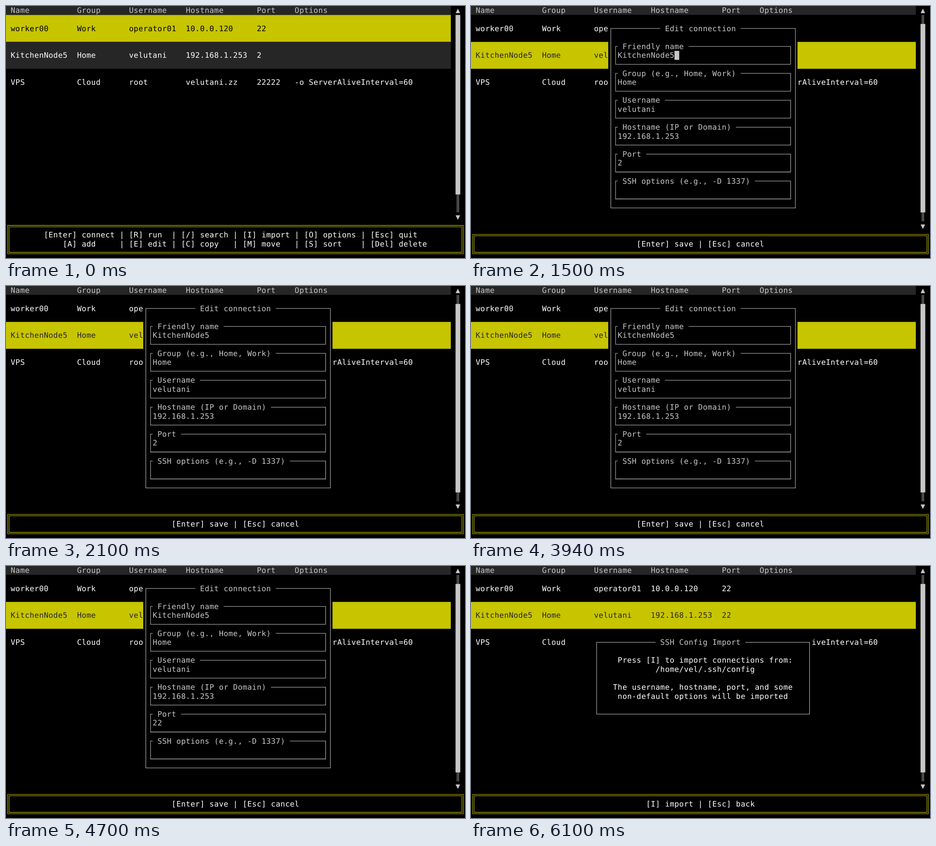
An HTML page for the animation above (8 s loop, 1000x550 px).

```html
<!DOCTYPE html>
<html lang="en">
<head>
<meta charset="utf-8">
<title>Connection manager</title>
<style>
  html, body { margin: 0; width: 100%; height: 100%; overflow: hidden; background: #000; }
  svg { display: block; width: 100vw; height: 100vh; }
  text {
    font: 16px "DejaVu Sans Mono", monospace;
    text-rendering: geometricPrecision;
    white-space: pre;
  }
  path { fill: none; stroke-width: 1; }
</style>
</head>
<body>
<svg id="screen" viewBox="0 0 970 533.5"></svg>
<script>
const LOOP = 8000;
const CW = 10, CH = 19, BASELINE = 15;
const BLACK = "#000", DARK = "#262626", GREY = "#c7c7c7", WHITE = "#fff", YELLOW = "#c7c400";

const COLUMNS = [1, 15, 26, 38, 53, 61];
const HEADERS = ["Name", "Group", "Username", "Hostname", "Port", "Options"];
const LABELS = ["Friendly name", "Group (e.g., Home, Work)", "Username",
  "Hostname (IP or Domain)", "Port", "SSH options (e.g., -D 1337)"];

const hosts = port => [
  ["worker00", "Work", "operator01", "10.0.0.120", "22", ""],
  ["KitchenNode5", "Home", "velutani", "192.168.1.253", port, ""],
  ["VPS", "Cloud", "root", "velutani.zz", "22222", "-o ServerAliveInterval=60"]
];

// Start time of each state; field is the one holding the visible cursor.
const STEPS = [
  { at: 0, view: "list", selected: 0 },
  { at: 500, view: "list" },
  { at: 1500, view: "edit", field: 0 },
  { at: 2100, view: "edit" },
  { at: 2460, view: "edit", field: 1 },
  { at: 2780, view: "edit", field: 2 },
  { at: 3060, view: "edit", field: 3 },
  { at: 3340, view: "edit", field: 4 },
  { at: 3940, view: "edit" },
  { at: 4140, view: "edit", field: 4, typed: "22" },
  { at: 4700, view: "edit", typed: "22" },
  { at: 5100, view: "list", port: "22" },
  { at: 6100, view: "import", port: "22" }
];

// All helpers take positions in terminal cells.
function text(col, row, str, color) {
  const xs = [...str].map((_, i) => (col + i) * CW).join(" ");
  const body = str.replace(/ /g, "\u00a0");
  return `<text x="${xs}" y="${row * CH + BASELINE}" fill="${color}">${body}</text>`;
}

function fill(col, row, cols, rows, color) {
  return `<rect x="${col * CW}" y="${row * CH}" width="${cols * CW}" height="${rows * CH}" fill="${color}"/>`;
}

function line(d, color) {
  return `<path d="${d}" stroke="${color}"/>`;
}

// Single-line frame whose top edge is broken by a title.
function titledBox(left, top, right, bottom, titleCol, title) {
  const x0 = left * CW + 5.5, x1 = right * CW + 5.5;
  const y0 = top * CH + 9.5, y1 = bottom * CH + 9.5;
  const gapStart = (titleCol - 1) * CW;
  const gapEnd = (titleCol + title.length + 1) * CW;
  return line(`M${gapStart} ${y0}H${x0}V${y1}H${x1}V${y0}H${gapEnd}`, GREY) +
    text(titleCol, top, title, GREY);
}

function table(selected, port) {
  let out = fill(0, 0, 94, 1, DARK);
  HEADERS.forEach((h, i) => out += text(COLUMNS[i], 0, h, GREY));
  hosts(port).forEach((host, i) => {
    const row = 1 + i * 3, active = i === selected;
    const back = i % 2 ? DARK : BLACK;
    out += fill(0, row, 94, 3, active ? YELLOW : back);
    host.forEach((cell, c) => {
      if (cell) out += text(COLUMNS[c], row + 1, cell, active ? back : WHITE);
    });
  });
  return out;
}

function scrollbar(offset, end) {
  const track = x => `M${x} ${CH}V${end * CH}`;
  return text(95, 0, "▲", GREY) + line(track(953.5) + track(956.5), GREY) +
    fill(95, 1 + offset, 1, end - 3, GREY) + text(95, end, "▼", GREY);
}

function footer(top, lines) {
  const y = top * CH;
  const frame = line(`M3.5 ${y + 8.5}H966.5V524.5H3.5Z`, YELLOW) +
    line(`M6.5 ${y + 11.5}H963.5V521.5H6.5Z`, YELLOW);
  return frame + lines.map(([col, str], i) => text(col, top + 1 + i, str, WHITE)).join("");
}

function editDialog(field, typed) {
  let out = fill(29, 2, 40, 21, BLACK) + titledBox(29, 2, 68, 22, 41, "Edit connection");
  const values = hosts(typed)[1];
  LABELS.forEach((label, i) => {
    const row = 4 + i * 3;
    out += titledBox(30, row, 67, row + 2, 32, label);
    if (values[i]) out += text(31, row + 1, values[i], GREY);
    if (i === field) out += fill(31 + values[i].length, row + 1, 1, 1, GREY);
  });
  return out;
}

function importDialog() {
  return fill(26, 8, 46, 9, BLACK) + titledBox(26, 8, 71, 16, 40, "SSH Config Import") +
    text(31, 10, "Press [I] to import connections from:", WHITE) +
    text(39, 11, "/home/vel/.ssh/config", WHITE) +
    text(30, 13, "The username, hostname, port, and some", WHITE) +
    text(31, 14, "non-default options will be imported", WHITE);
}

function render({ view, selected = 1, port = "2", field, typed = "2" }) {
  const base = table(selected, port);
  if (view === "list") {
    return base + scrollbar(selected, 23) + footer(24, [
      [8, "[Enter] connect | [R] run  | [/] search | [I] import | [O] options | [Esc] quit"],
      [12, "[A] add     | [E] edit | [C] copy   | [M] move   | [S] sort    | [Del] delete"]
    ]);
  }
  const editing = view === "edit";
  const hint = editing ? [35, "[Enter] save | [Esc] cancel"] : [37, "[I] import | [Esc] back"];
  return base + scrollbar(selected, 24) + footer(25, [hint]) +
    (editing ? editDialog(field, typed) : importDialog());
}

const screenEl = document.getElementById("screen");
let shown = null;

function update() {
  const t = performance.now() % LOOP;
  const step = STEPS.filter(s => s.at <= t).pop();
  if (step !== shown) {
    screenEl.innerHTML = render(step);
    shown = step;
  }
  requestAnimationFrame(update);
}
update();
</script>
</body>
</html>
```
